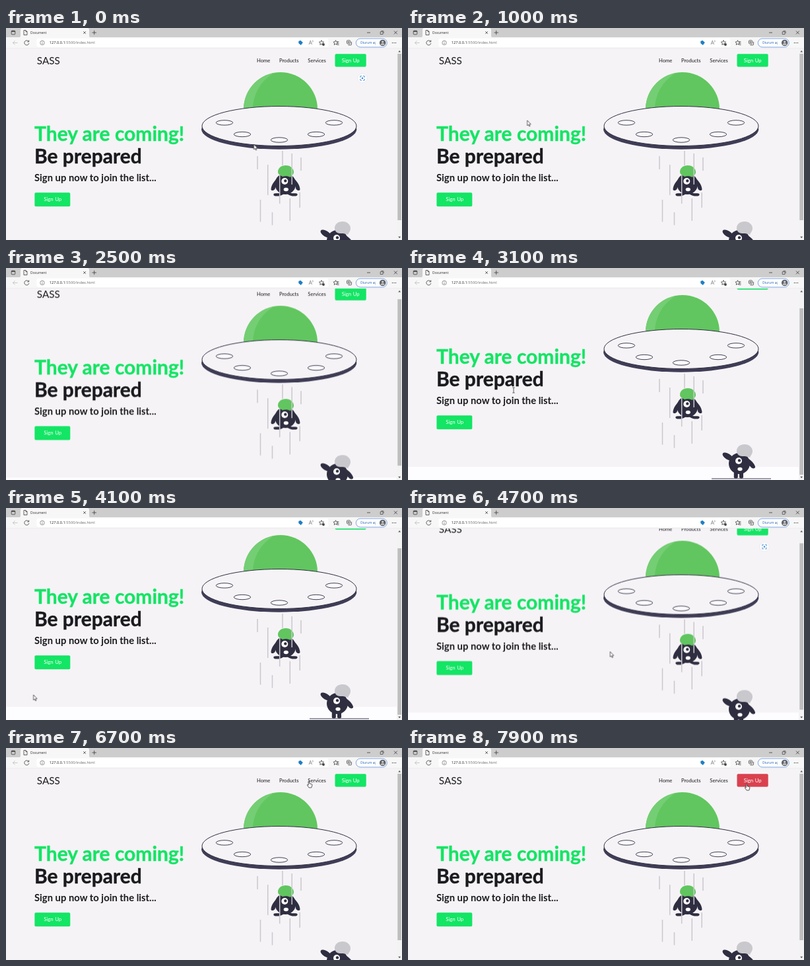
Recreate the animation shown at these times as an HTML page. Size 600x321 px, loop 8 s.

```html
<!DOCTYPE html>
<html lang="en">
<head>
<meta charset="utf-8">
<title>Document</title>
<style>
  html, body { margin: 0; width: 100%; height: 100%; overflow: hidden; background: #f5f3f6; }
  body > svg { display: block; width: 100%; height: 100%; }
  :root { --green: #13e564; --ink: #1b1a1e; --dark: #2f2e41; --page: #f5f3f6; }

  .ui { font-family: "Open Sans", "Noto Sans", sans-serif; }
  .site { font-family: Lato, "Open Sans", sans-serif; fill: var(--ink); }
  .big { font-size: 30px; font-weight: 700; stroke: var(--ink); stroke-width: .4; }
  .sub { font-size: 14.8px; font-weight: 700; }
  .logo { font-size: 15.3px; }
  .nav { font-size: 7.6px; }
  .label { font-size: 7.8px; word-spacing: .6px; fill: #fff; }
  .line { fill: none; stroke: #3b3b3b; stroke-width: .8; }
  .green { fill: var(--green); }
  .big.green { stroke: var(--green); }
  .white { fill: #fff; }
  .dark { fill: var(--dark); }

  .move { animation: 8s ease-in-out infinite; }
  .show { animation: 8s step-end infinite; }
  .tint { animation: 8s linear infinite; }

  #page { animation-name: scroll; animation-timing-function: linear; }
  #thumb { animation-name: thumb; animation-timing-function: linear; }
  #pointer { animation-name: travel; }
  #arrow { animation-name: arrow; }
  #beam { animation-name: beam; }
  #hand { animation-name: hand; }
  #lens { animation-name: lens; }
  #home { animation-name: home; }
  #products { animation-name: products; }
  #services { animation-name: services; }
  #signup { animation-name: signup; }

  @keyframes scroll {
    0%, 29%, 62%, 100% { transform: translateY(0); }
    35%, 56.5% { transform: translateY(-26px); }
    58.75% { transform: translateY(-17.5px); }
  }
  @keyframes thumb {
    0%, 29%, 62%, 100% { transform: translateY(0); }
    35%, 56.5% { transform: translateY(22px); }
    58.75% { transform: translateY(14.5px); }
  }
  @keyframes travel {
    0%, 3% { transform: translate(375.5px, 176px); }
    17%, 23.75% { transform: translate(127.5px, 130px); }
    28%, 40% { transform: translate(160px, 185px); }
    51% { transform: translate(41px, 283px); }
    58.75%, 63% { transform: translate(306.3px, 217.5px); }
    70%, 74% { transform: translate(399px, 49px); }
    77%, 79% { transform: translate(428px, 50px); }
    83.75% { transform: translate(459px, 50px); }
    88% { transform: translate(468px, 51px); }
    93%, 100% { transform: translate(513px, 54px); }
  }
  @keyframes arrow {
    0% { opacity: 1; }
    27% { opacity: 0; }
    42% { opacity: 1; }
    69%, 100% { opacity: 0; }
  }
  @keyframes beam {
    0% { opacity: 0; }
    27% { opacity: 1; }
    42%, 100% { opacity: 0; }
  }
  @keyframes hand {
    0% { opacity: 0; }
    69%, 100% { opacity: 1; }
  }
  @keyframes lens {
    0% { opacity: 1; }
    8.5% { opacity: 0; }
    58% { opacity: 1; }
    67%, 100% { opacity: 0; }
  }
  @keyframes home {
    0%, 69%, 76%, 100% { fill: var(--ink); }
    70%, 75% { fill: var(--green); }
  }
  @keyframes products {
    0%, 76%, 82%, 100% { fill: var(--ink); }
    77%, 81% { fill: var(--green); }
  }
  @keyframes services {
    0%, 84%, 91%, 100% { fill: var(--ink); }
    85%, 90% { fill: var(--green); }
  }
  @keyframes signup {
    0%, 91% { fill: var(--green); }
    93%, 100% { fill: #da414f; }
  }
</style>
</head>
<body>
<svg viewBox="0 0 600 321" preserveAspectRatio="none">
  <defs>
    <!-- head with one eye and a mouth, centred on the origin -->
    <g id="face">
      <circle r="16" class="dark"/>
      <circle cx="-1" cy="-4" r="5" class="white"/>
      <circle cx="0" cy="-4.6" r="2.2" class="dark"/>
      <ellipse cx="1" cy="8.5" rx="3.6" ry="2.8" class="white"/>
    </g>
  </defs>

  <!-- web page -->
  <svg y="31" width="592" height="290" viewBox="0 31 592 290">
    <rect y="31" width="592" height="290" fill="#fdfcfe"/>
    <g id="page" class="move">
      <rect width="592" height="327" fill="var(--page)"/>

      <g class="site">
        <text class="logo" x="46.8" y="54.6">SASS</text>
        <g class="nav">
          <text id="home" class="tint" x="380" y="51.7">Home</text>
          <text id="products" class="tint" x="414" y="51.7">Products</text>
          <text id="services" class="tint" x="457.3" y="51.7">Services</text>
        </g>
        <rect id="signup" class="tint" x="498.5" y="39.2" width="47.2" height="19.5" rx="1.8"/>
        <text class="label" x="508.7" y="51.7">Sign Up</text>
        <rect class="green" x="43.4" y="249.2" width="53.9" height="21" rx="1.8"/>
        <text class="label" x="57.2" y="262.4">Sign Up</text>
        <text class="big green" x="43" y="171">They are coming!</text>
        <text class="big" x="43" y="204.6">Be prepared</text>
        <text class="sub" x="43" y="231.6">Sign up now to join the list...</text>
      </g>

      <!-- saucer -->
      <path d="M360 123a56 56 0 0 1 112 0z" fill="#61c65f"/>
      <path d="M360 123A56 56 0 0 1 407 67.8C388 78 374.5 98 374 123z" fill="#74ce73"/>
      <ellipse cx="413.7" cy="153.4" rx="117.6" ry="30.3" fill="#3f3d56"/>
      <ellipse cx="414" cy="148.5" rx="117" ry="30" fill="var(--page)" stroke="#2f2e41"/>
      <g fill="#faf9fb" stroke="#2f2e41" stroke-width=".9">
        <ellipse cx="331" cy="143.4" rx="12.7" ry="3.7"/>
        <ellipse cx="497" cy="143.4" rx="12.7" ry="3.7"/>
        <ellipse cx="358" cy="161" rx="12.7" ry="3.7"/>
        <ellipse cx="470" cy="161" rx="12.7" ry="3.7"/>
        <ellipse cx="414" cy="169.5" rx="12.7" ry="3.7"/>
      </g>

      <!-- lifted visitor -->
      <g class="dark">
        <path d="M411 228c-5 4-9 10-9.500 16 0 3 4 2.500 6 0zM436 228c5 4 9 10 9.500 16 0 3-4 2.500-6 0z"/>
        <path d="M417 249c-3 2-6 1-10 1.500-2.500.5-2 3.500 1 4 5 .5 9-.5 13-3.500zM430 249c3 2 6 1 10 1.500 2.500.5 2 3.500-1 4-5 .5-9-.5-13-3.500z"/>
      </g>
      <use href="#face" x="423.3" y="236"/>
      <path d="M412 218c0-6 5-10 12-10s12 5 12 10c0 4-3 5-5 8-4-2-8-2-12-1-3-2-7-3-7-7z" fill="#61c65f"/>
      <path fill="none" stroke="#cac8cd" stroke-width="1.5"
        d="M381 194v20M396.700 207v46M419 186v22M433.200 190v47M447 196v20M414.700 222v44M385.500 260v33.500M403.500 279v19.500M430.300 258v34M445.200 249v23"/>

      <!-- waiting visitor -->
      <path d="M460 345h90" stroke="#3f3d56"/>
      <g class="dark">
        <ellipse cx="484.500" cy="311.500" rx="9" ry="4.300" transform="rotate(32 484.500 311.500)"/>
        <path d="M514 314c5 2 10 7 12 12.500.7 3-3 4-5.500 2l-5-5z"/>
        <rect x="493.800" y="332" width="6" height="12.500" rx="2"/>
        <rect x="502" y="332" width="6" height="12.500" rx="2"/>
      </g>
      <use href="#face" x="502" y="322"/>
      <path d="M498 303c0-6 5-10 12-10s12 5 12 10c0 5-3 7-4 10-4-2-8-2-12-2-4 0-8-3-8-8z" fill="#c9c8cc"/>

      <g id="lens" class="show">
        <circle cx="540" cy="76" r="7" fill="#fff" stroke="#e6e4ea" stroke-width=".7"/>
        <path d="M536.800 75v-2.200h2.200M541 72.800h2.200v2.200M543.200 77v2.200h-2.200M539 79.200h-2.200v-2.200" fill="none" stroke="#3b8bd6" stroke-width=".9"/>
        <circle cx="540" cy="76" r="1.300" fill="#3b8bd6"/>
      </g>
    </g>
  </svg>

  <!-- scroll bar -->
  <rect x="592" y="31" width="8" height="290" fill="#f3f3f4"/>
  <rect id="thumb" class="move" x="593.3" y="39" width="5.7" height="252" fill="#bebebf"/>
  <path d="M594.300 36.500l1.900-2.500 1.900 2.500zM594.300 315.800l1.900 2.500 1.900-2.500z" fill="#555"/>

  <!-- browser frame -->
  <rect width="600" height="31" fill="#cdcdcd"/>
  <path d="M0 14H20q2 0 2-2V3q0-3 3-3h98q3 0 3 3v9q0 2 2 2H600V31H0z" fill="#f7f7f7"/>
  <path d="M0 30.800H600" stroke="#e2e1e4" stroke-width=".6"/>
  <rect x="46.5" y="15.8" width="442" height="13" rx="3" fill="#fff"/>
  <g class="line">
    <rect x="8.2" y="4.2" width="5.6" height="5.6" rx="1"/>
    <path d="M8.200 5h5.600" stroke-width="1.5"/>
    <path d="M27 3.500h3l2 2v5h-5zM30 3.500v2h2"/>
    <path d="M117.300 5.200l3.600 3.600m0-3.600l-3.600 3.600M130.500 7h6.400M133.700 3.800v6.400"/>
    <path d="M547 7h5M588 4.500l4.800 4.800m0-4.800l-4.800 4.800"/>
    <path d="M567.200 5.700h3.800v3.800h-3.800zM568.500 4.400h2.700q1 0 1 1v2.700" stroke-width=".7"/>
    <path d="M17.500 22.400h-7m3-3l-3 3 3 3" stroke="#bcbcbc"/>
    <path d="M34.300 20.500a3.500 3.500 0 1 0 .5 2.600M34.700 18.500v2.400h-2.400"/>
    <circle cx="55" cy="22.4" r="3.2" stroke="#666" stroke-width=".7"/>
    <path d="M55 22v2.200M55 20.400v.8" stroke="#666"/>
    <path d="M459 25l2.300-6 2.300 6m-3.800-2h3M464.500 18.500q1.400 1.500 0 3" stroke="#777" stroke-width=".7"/>
    <path id="star" d="M478 18.600l1.100 2.300 2.500.3-1.800 1.700.4 2.500-2.200-1.200-2.200 1.200.4-2.500-1.800-1.700 2.500-.3z"/>
    <use href="#star" x="21.5"/>
    <path d="M501.500 21h3M502 23.400h2.500M502.500 25.500h2"/>
    <rect x="516.5" y="18.8" width="5" height="5" rx="1"/>
    <path d="M518.500 25.800h4q1 0 1-1v-4M519 20v2.700M517.600 21.300h2.800"/>
  </g>
  <circle cx="481" cy="25" r="1.9" fill="#444"/>
  <path d="M443.300 20l3-1.300 3.500 3.200-3 4-3.500-2.900z" fill="#1d7fc4"/>
  <rect x="530.3" y="16" width="47" height="13" rx="6.5" fill="#fff" stroke="#5b8fdb" stroke-width=".8"/>
  <circle cx="570.7" cy="22.5" r="4.8" fill="#62636b"/>
  <circle cx="570.7" cy="21" r="1.6" fill="#d3d3d6"/>
  <path d="M567.700 25.400a3 2.200 0 0 1 6 0z" fill="#d3d3d6"/>
  <g fill="#444">
    <circle cx="585.5" cy="22.5" r=".7"/><circle cx="588" cy="22.5" r=".7"/><circle cx="590.5" cy="22.5" r=".7"/>
  </g>
  <g class="ui">
    <text x="37" y="9" font-size="5" fill="#2b2b2b">Document</text>
    <text x="65.8" y="24.4" font-size="5.7" fill="#222">127.0.0.1<tspan fill="#6c6c6c">:5500/index.html</tspan></text>
    <text x="536.7" y="24.2" font-size="4.8" fill="#2460b8">Oturum aç</text>
  </g>

  <!-- pointer -->
  <g id="pointer" class="move">
    <path id="arrow" class="show" d="M0 0v8l1.800-1.600 1.200 2.700 1.200-.5-1.200-2.700h2.500z" fill="#fff" stroke="#222" stroke-width=".7"/>
    <path id="beam" class="show" d="M-1.700-4h1.200q.5 0 .5.500v7q0 .5-.5.500h-1.200M1.700-4h-1.200q-.5 0-.5.500M1.700 4h-1.200q-.5 0-.5-.5" fill="none" stroke="#333" stroke-width=".8"/>
    <path id="hand" class="show" d="M-.8.600q.8-1.200 1.600 0v3.200l3.200.8q1 .3.900 1.400l-.6 2.500-.5 1.500h-3.800l-2.400-3.300q-.5-1.200.5-1.300l1.100.9z" fill="#fff" stroke="#222" stroke-width=".75"/>
  </g>
</svg>
</body>
</html>
```
